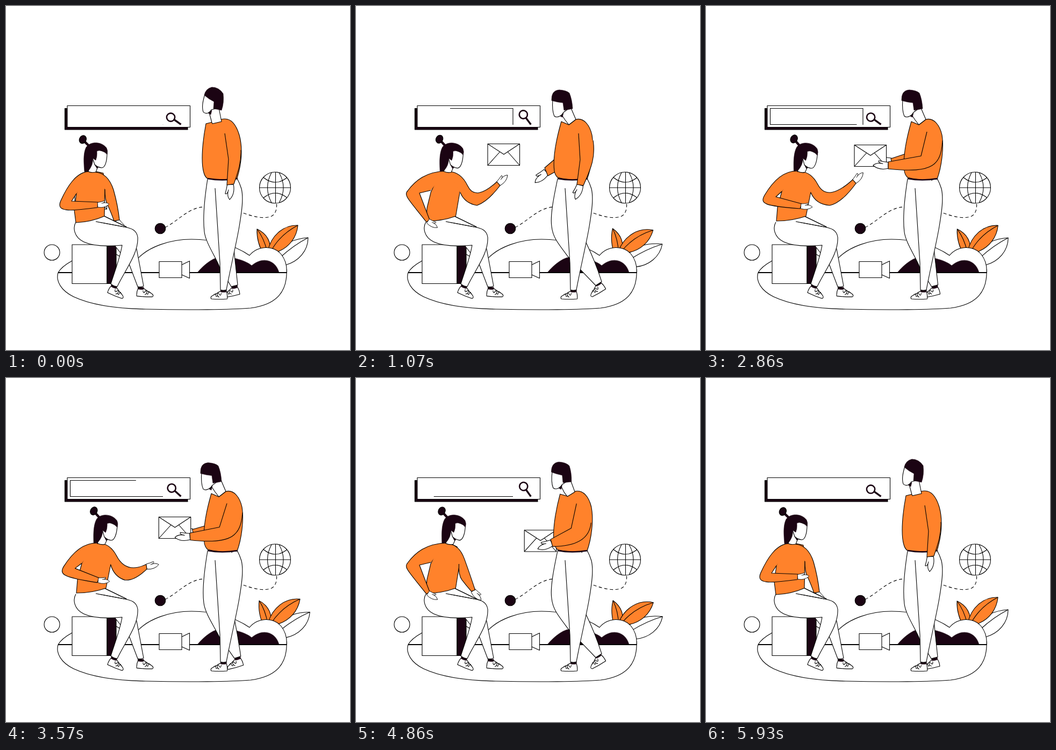
Write an HTML page that moves like this. It is 640 px wide and 640 px high and loops after 6000 ms.

```html
<!DOCTYPE html>
<html lang="en">
<head>
<meta charset="utf-8">
<title>Passing a message</title>
<style>
html, body { margin: 0; width: 100%; height: 100%; overflow: hidden; background: #fff }
svg { display: block; width: 100vw; height: 100vh }
</style>
</head>
<body>
<svg id="stage" viewBox="0 0 640 640" stroke="#000" stroke-width="1.1" stroke-linejoin="round" fill="none"></svg>
<script>
const LOOP = 6000, ORANGE = '#ff822b', DARK = '#1b0413';

// --- drawing helpers ---
const path = (d, fill = '#fff', more = '') => `<path d="${d}" fill="${fill}" ${more}/>`;
const line = (d, more) => path(d, 'none', more);
const group = (transform, body) => `<g transform="${transform}">${body}</g>`;
const dark = d => path(d, DARK, `stroke="${DARK}" stroke-width=".6"`);

// --- interpolation helpers ---
const nums = s => String(s).match(/-?[\d.]+/g).map(Number);
const refill = (shape, v) => { let i = 0; return shape.replace(/[\d.]+/g, () => v[i++].toFixed(2)); };
const mix = (a, b, k) => { const q = nums(b); return refill(a, nums(a).map((x, i) => x + (q[i] - x) * k)); };

// Monotone cubic through a column of values
function smooth(T, v, t) {
  const n = T.length - 1;
  let i = 0;
  while (i < n - 1 && t >= T[i + 1]) i++;
  const slope = j => (v[j + 1] - v[j]) / (T[j + 1] - T[j]);
  const tangent = j => {
    if (j < 1 || j >= n) return 0;
    const a = slope(j - 1), b = slope(j);
    return a * b <= 0 ? 0 : 2 * a * b / (a + b);
  };
  const h = T[i + 1] - T[i], u = Math.min(1, (t - T[i]) / h), w = 1 - u;
  return (1 + 2 * u) * w * w * v[i] + u * w * w * h * tangent(i)
    + u * u * (3 - 2 * u) * v[i + 1] - u * u * w * h * tangent(i + 1);
}
const ONCE = { T: [0, 1070, 1790, 2860, 4210, 5430, 5930], order: [0, 1, 2, 3, 4, 5, 0] };
const MIRROR = { T: [0, 570, 1070, 1790, 2700, 3200, 4210, 4900, 5430, 5930], order: [0, 5, 1, 2, 3, 3, 4, 1, 5, 0] };
function track(poses, { T, order } = ONCE) {
  const rows = order.map(i => nums(poses[i]));
  return t => rows[0].map((_, k) => smooth(T, rows.map(r => r[k]), t));
}

// --- motion ---
const man = {
  step: track([0, 1, .78, .02, .8, .35], MIRROR),
  lean: track([0, 1, 1, 1, 1, .4]),
  nod: track([0, 0, 1, 0, .85, 0]),
  near: ['M407 237L414 285 411 333 424 331C432 308 438 290 437 268',
    'M414 237L417 286 411 332 423 334C433 310 447 285 441 250',
    'M414 236L412 283 373 318 378 330C400 320 434 305 436 290',
    'M411 234L400 279 339 290 339 303C425 312 437 295 440 250',
    'M411 233L396 277 348 288 350 301C420 310 437 290 440 250',
    'M409 235L407 283 382 318 388 327C410 316 433 303 435 285'],
  nearTurn: track([93, 108, 135, 180, 170, 136]),
  far: ['M385 285L388 305 398 308 400 290',
    'M372 283L351 301 357 316 375 306',
    'M374 278L347 293 351 309 376 305',
    'M374 274L344 284 346 294 374 292',
    'M374 274L352 281 354 290 374 290',
    'M380 295L376 318 384 328 400 315'],
  farTurn: track([100, 136, 146, 180, 170, 130])
};
const woman = {
  lean: track([0, .85, 1, 1, 1, .45]),
  nod: track([0, .65, 1, 1.1, 1.05, .6]),
  left: ['M158 308C130 306 112 340 102 362C92 384 118 382 170 375L171 365 122 363 131 349',
    'M168 307C130 308 110 325 96 344C88 352 98 360 131 402L137 398 118 348 139 343',
    'M170 307C140 306 118 325 103 350C94 362 120 372 154 393L159 386 125 352 140 343',
    'M170 307C142 306 122 330 109 352C100 368 108 372 175 377L178 368 130 355 141 345',
    'M170 307C140 306 118 325 101 347C92 360 112 368 150 393L156 386 123 351 140 344',
    'M165 307C132 308 112 332 99 356C90 372 112 377 158 391L160 382 120 358 136 346'],
  leftTurn: track([-4, 35, 12, 4, 14, 8], MIRROR),
  right: ['M166 309Q190 311 200 342Q208 370 211 398L201 400Q196 385 188 368Q184 360 184 341',
    'M172 308Q195 308 208 335Q222 364 262 327L268 334Q245 364 225 371Q202 367 194 347',
    'M174 308Q196 308 208 333Q225 365 272 324L278 331Q252 366 230 371Q204 369 195 347',
    'M176 308Q196 309 208 332Q226 366 273 323L279 330Q252 367 230 371Q204 369 195 347',
    'M174 308Q192 308 203 330Q219 364 242 376L238 384Q220 387 208 380Q196 370 194 347',
    'M168 309Q192 311 201 343Q209 372 211 402L202 402Q197 385 190 370Q186 362 188 344'],
  rightTurn: track([58, -43, -48, -45, 30, 60])
};
const arms = {
  near: track(man.near), far: track(man.far),
  left: track(woman.left, MIRROR), right: track(woman.right)
};
const letterAt = track(['128 338', '140 335', '245 256.5', '255.5 258.5', '276 258.5', '293 258.5', '339 303', '372 276'],
  { T: [0, 400, 1070, 1790, 2860, 4210, 5430, 5930], order: [0, 1, 2, 3, 4, 5, 6, 7] });

// --- parts ---
// A hand sits on the cuff, whose two ends start at index c
const hand = (v, c, turn, size, flip = 1) => group(
  `translate(${(v[c] + v[c + 2]) / 2} ${(v[c + 1] + v[c + 3]) / 2}) rotate(${turn}) scale(${size} ${size * flip})`,
  path('M0 6Q10 7 18 9Q20 6 14 4Q24 5 29 0Q18 -10 0 -6Z') + line('M14 4L10 3'));

const shoe = (x, y, turn, flip = 1) => group(`translate(${x} ${y}) rotate(${turn}) scale(${flip} 1)`,
  path('M-5 0Q-12 5 -19 8Q-26 12 -22 15Q-8 16 7 15Q8 7 5 0Z') +
  dark('M-5 -2H6L5 2Q0 3 -5 2Z') +
  line('M-18 8q4 -5 4 0t3 1q-1 -9 3 -3q3 5 4 -2M-11 9l3 3'));

const leaf = (turn, cx, cy, edge, vein, fill) =>
  group(`rotate(${turn} ${cx} ${cy})`, path(edge, fill) + line(vein));

const leaves = sway =>
  leaf(12.8 * sway, 500, 480, 'M562 431C535 433 515 443 505 458L520 482C545 475 562 455 562 431Z', 'M562 431Q535 445 510 468') +
  leaf(12.8 * sway, 478, 472, 'M467 415C466 435 472 450 480 464L492 462C494 440 487 424 467 415Z', 'M467 415Q480 432 486 457', ORANGE) +
  leaf(12.8 * sway, 498, 466, 'M543 408C515 407 493 428 487 456L503 458C527 450 541 430 543 408Z', 'M543 408Q510 425 493 456', ORANGE);

const backdrop =
  line('M97 496C92 512 103 530 126 541C160 557 205 563 260 564C340 566 420 565 455 562C500 556 524 535 522 490M97 496Q103 485 123 474M205 462L212 466') +
  path('M244 471C265 448 305 434 345 434C390 434 425 445 453 464C468 446 497 444 512 462C520 472 523 484 522 497', '#fff') +
  dark('M356 496C368 482 384 468 400 467C425 466 450 476 457 483C478 465 502 473 508 496Z') +
  line('M97 496H522', 'stroke-width="1.8"') +
  path('M123 444H188V516.5H123Z') + path('M188 444H205V516.5H188Z', DARK) +
  path('M285 475.5H327V505.5H285ZM327 481.5L341.5 474.5V506.5L327 500') +
  '<circle cx="85.5" cy="458.5" r="14.5"/>' +
  line('M296 412C320 400 340 375 367 374C400 373 418 378 438 384C460 392 480 397 494 391C503 386 504 375 503.5 367', 'stroke-dasharray="6 4.5"') +
  `<circle cx="287" cy="414" r="9.8" fill="${DARK}"/>` +
  '<circle cx="500.5" cy="338" r="29"/>' +
  line('M494 310Q479 338 494 366M508 310Q524 338 508 366') +
  line('M501.5 309V367M471.5 338H529.5M479 319Q501 337 523 319M479 357Q501 339 523 357') +
  path('M109.5 190.5H338V230H109.5Z', DARK) + path('M114 185.5H342.5V225.5H114Z');

function searchBar(t, sway) {
  const len = 405.5, part = from => len * Math.max(0, Math.min(1, (t - from) / 2945));
  const start = part(2985), end = part(0);
  return line('M292 221V190.5H119.5V220.5H292', `stroke-dasharray="0 ${start} ${end - start} 999"`) +
    group(`rotate(${22 * sway} 325 220)`,
      `<circle cx="306.5" cy="207" r="7.6" stroke="${DARK}" stroke-width="2.6"/>` +
      line('M313 211.5L325.5 220.3', `stroke="${DARK}" stroke-width="3.4"`));
}

const letter = t => group(`translate(${letterAt(t)})`,
  path('M0 0H59.5V40H0Z') + line('M0 0L30 19.5 59.5 0M0 40L23 14.5M59.5 40L37 14.5'));

const womanLegs =
  shoe(251, 525, 3, -1) + shoe(201, 522, 22, -1) +
  path('M183 391L224 411 243 452 256 521Q250 524 245 522L229 480 205 449') +
  path('M130 402C124 412 126 430 145 439C165 448 195 447 216 445C212 470 200 500 195 517Q201 522 207 522C222 490 247 460 245 430C243 415 230 413 220 411L167 401') +
  path('M132 400L183 392 205 404 167 402 150 415Z', '#fff', 'stroke="none"') +
  line('M183 391L224 411M167 401L220 411');

const womanHead =
  path('M159 288L153 308Q160 311 167 309L171 299') + dark('M165 295L172 300 169 302Z') +
  path('M168 266L188 273C188 290 184 301 178 301Q170 300 165 295L160 280Z') +
  dark('M146 308C145 295 143 275 149 263C157 251 178 252 187 264Q190 270 188 276Q178 266 169 270Q170 280 167 287L161 283Q163 295 153 307Z') +
  line('M146 252L158 264', `stroke="${DARK}" stroke-width="4.5"`) +
  `<ellipse cx="143" cy="248.3" rx="6.3" ry="7.8" fill="${DARK}" transform="rotate(25 143 248)"/>`;

function drawWoman(t) {
  const left = arms.left(t), right = arms.right(t), [nod] = woman.nod(t);
  return hand(right, 8, woman.rightTurn(t), .8, -1) + womanLegs +
    path(mix('M147 308L131 349 127 380 130 403Q158 402 183 391L184 341 181 311Q165 306 147 308Z',
      'M160 308L141 345 133 375 131 400Q160 400 186 391L195 346 190 315Q176 306 160 308Z', woman.lean(t)[0]), ORANGE) +
    path(refill(woman.right[0], right), ORANGE) +
    path(refill(woman.left[0], left), ORANGE) +
    hand(left, 12, woman.leftTurn(t), .74, -1) +
    group(`translate(${16 * nod} 0) rotate(${3 * nod} 160 303)`, womanHead);
}

const drawManHead = lean =>
  dark(mix('M376 199L383 194 381 202Z', 'M380 205L386 199 384 207Z', lean)) +
  path(mix('M370 164C366 178 364 188 367 197Q370 201 376 199Q380 197 382 193L395 190 393 165Z',
    'M366 174C365 186 365 196 369 205Q373 208 379 205Q383 203 386 198L399 188 396 170Z', lean)) +
  dark(mix('M369 166Q371 154 383 151Q396 151 404 163Q406 180 401 194Q393 192 386 191L387 178Q377 173 369 166Z',
    'M364 176Q363 157 378 156Q392 157 397 162Q402 174 403 191Q394 193 387 194L385 180Q374 179 364 176Z', lean));

function drawManBody(t) {
  const [step] = man.step(t), [lean] = man.lean(t), [nod] = man.nod(t), near = arms.near(t);
  return shoe(425 + 26 * step, 523 - 6 * step, -12 - 18 * step) +
    path(mix('M375 322C369 360 366 395 369 420C371 440 392 470 397 485L419 522 431 519C428 490 425 465 424 450L420 322',
      'M375 322C368 355 361 390 364 410C366 430 376 442 395 467L446 520 457 513C450 490 440 465 428 440L420 322', step)) +
    shoe(404.5, 530, 0) +
    path('M389 339L398 478 399 528Q404 530 410 528C417 490 429 440 434 410C439 380 442 357 438 340Q435 330 430 321') +
    path(mix('M372 219C366 250 362 290 368 310Q370 318 375 321Q402 325 430 320C438 295 441 265 434 240C428 220 418 206 400 211L384 216Z',
      'M382 215C372 250 366 285 369 307Q370 314 375 319Q402 326 430 322C438 300 443 265 439 240C435 222 424 207 409 211L396 221Z', lean), ORANGE) +
    line('M375 321Q402 326 431 321', `stroke="${DARK}" stroke-width="2.6"`) +
    path(mix('M378 198L383 217 384 219 401 215 396 190', 'M383 203L389 212 396 221 409 211 400 190', lean)) +
    group(`translate(${-4.5 * nod} ${3.5 * nod})`, drawManHead(lean)) +
    hand(near, 4, man.nearTurn(t), .97) +
    path(refill(man.near[0], near), ORANGE);
}

function drawFarArm(t) {
  const far = arms.far(t);
  return hand(far, 2, man.farTurn(t), 1) + path(refill(man.far[0], far), ORANGE);
}

// --- loop ---
const stage = document.getElementById('stage');
function frame() {
  const t = performance.now() % LOOP;
  const sway = (1 - Math.cos(2 * Math.PI * t / 3000)) / 2;
  stage.innerHTML = leaves(sway) + backdrop + searchBar(t, sway) +
    drawFarArm(t) + letter(t) + drawWoman(t) + drawManBody(t);
  requestAnimationFrame(frame);
}
frame();
</script>
</body>
</html>
```
